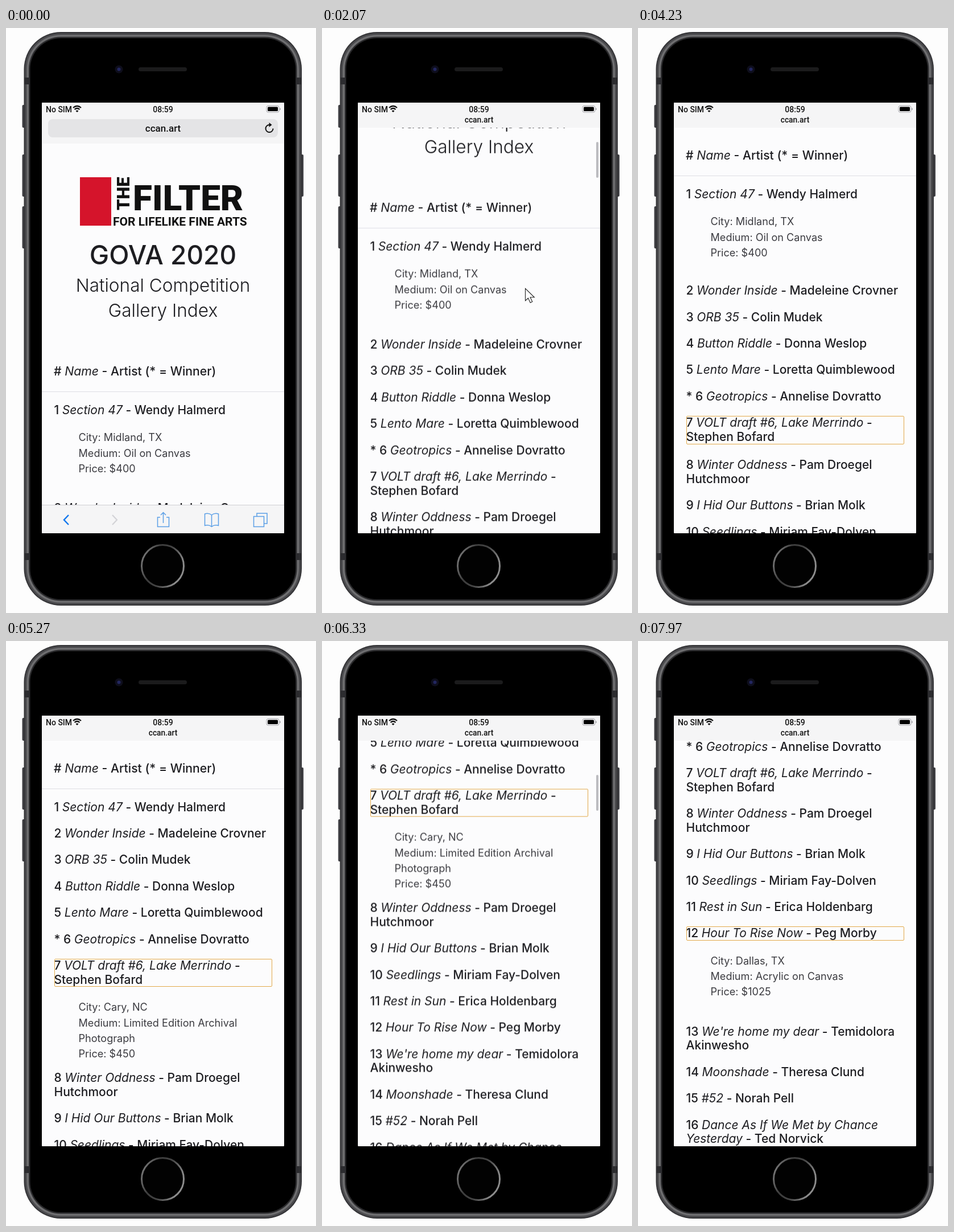
Recreate the animation shown at these times as an HTML page. Size 545 by 1027 pixels, loop 8000 ms.

```html
<!DOCTYPE html>
<html lang="en">
<head>
<meta charset="utf-8">
<title>Gallery index on a phone</title>
<style>
html, body { margin: 0; width: 100%; height: 100%; overflow: hidden; background: #fdfdfd; }
#stage { position: relative; width: 545px; height: 1027px; overflow: hidden; color: #1d1d21; }
#stage svg { position: absolute; left: 0; top: 0; overflow: visible; }
#screen { position: absolute; left: 63px; top: 131px; width: 426px; height: 756px; overflow: hidden; background: #fcfcfd; border-radius: 1px; }
/* children of .origin use stage coordinates */
.origin { position: absolute; left: -63px; top: -131px; width: 545px; height: 1027px; }
#page { font-family: Inter, "Open Sans", sans-serif; white-space: nowrap; will-change: transform; }
.line { position: absolute; left: 63px; width: 426px; text-align: center; line-height: 50px; }
.big { top: 373px; font-size: 46px; font-weight: 500; }
.sub { font-size: 31.6px; font-weight: 300; }
.head { position: absolute; left: 84px; top: 590px; font-size: 21.2px; line-height: 24.7px; font-weight: 450; }
.rule { position: absolute; left: 63px; top: 638px; width: 426px; height: 1px; background: #dedee4; }
#list { position: absolute; left: 84.5px; top: 658.6px; width: 383px; }
.item { margin-bottom: 21.7px; }
.name { font-size: 21px; line-height: 24.7px; font-weight: 450; border-radius: 2px; }
.name.on { outline: 1.5px solid #e2a94a; outline-offset: -1px; }
.info { overflow: hidden; height: 0; font-size: 18.1px; line-height: 27.2px; color: #3b3b40; }
.info div { padding: 22px 0 0 43px; }
.bar { position: absolute; background: #f5f5f6; left: 63px; width: 426px; }
#top { top: 131px; height: 72px; }
#field { position: absolute; left: 74px; top: 160px; width: 404px; height: 32px; border-radius: 8px; background: #e4e4e6; }
.ui { position: absolute; font: 500 14px/20px Roboto, sans-serif; color: #111; }
#url { left: 176px; width: 200px; top: 166px; text-align: center; font-size: 17px; }
#thumb { position: absolute; left: 482px; width: 4px; height: 63px; border-radius: 2px; background: #bcbcc0; }
#tools { top: 837px; height: 49px; border-top: 1px solid #cfcfd4; }
</style>
</head>
<body>
<div id="stage">
  <svg width="545" height="1027">
    <defs>
      <linearGradient id="ring" x2="1" y2=".4">
        <stop offset="0" stop-color="#8c8c8c"/><stop offset=".4" stop-color="#3c3c3c"/>
        <stop offset=".65" stop-color="#444"/><stop offset="1" stop-color="#8c8c8c"/>
      </linearGradient>
    </defs>
    <g fill="#3f3f43">
      <rect x="28.500" y="135" width="6" height="40" rx="2"/>
      <rect x="28.500" y="222" width="6" height="74" rx="2"/>
      <rect x="28.500" y="313" width="6" height="74" rx="2"/>
      <rect x="517" y="222" width="6" height="74" rx="2"/>
    </g>
    <g id="shell"></g>
    <g fill="#2c2c2f">
      <rect x="32" y="87" width="9" height="12"/><rect x="511" y="87" width="9" height="12"/>
      <rect x="32" y="922" width="9" height="12"/><rect x="511" y="922" width="9" height="12"/>
    </g>
    <circle cx="198.500" cy="72.500" r="7" fill="#0e0e1c"/>
    <circle cx="198.500" cy="72.500" r="3" fill="#22265f"/>
    <rect x="233" y="69" width="85" height="7" rx="3.500" fill="#1b1b1c"/>
    <circle cx="275.500" cy="944.500" r="37" fill="#020202" stroke="url(#ring)" stroke-width="3"/>
  </svg>

  <div id="screen">
    <div id="page" class="origin">
      <svg width="545" height="400" font-family="Roboto, sans-serif" font-weight="900" fill="#111">
        <rect x="130" y="262" width="55" height="85" fill="#d5142b"/>
        <text font-size="31" transform="translate(217 320) rotate(-90)">THE</text>
        <text x="223" y="320" font-size="62">FILTER</text>
        <text x="188" y="347" font-size="21" font-weight="700">FOR LIFELIKE FINE ARTS</text>
      </svg>
      <div class="line big">GOVA 2020</div>
      <div class="line sub" style="top:427px">National Competition</div>
      <div class="line sub" style="top:471px">Gallery Index</div>
      <div class="head"># <i>Name</i> - Artist (* = Winner)</div>
      <div class="rule"></div>
      <div id="list"></div>
    </div>
    <div class="origin">
      <div id="thumb"></div>
      <div id="top" class="bar"></div>
      <div id="field"></div>
      <div class="ui" style="left:70px;top:133px">No SIM</div>
      <div class="ui" style="left:226px;width:100px;top:133px;text-align:center">08:59</div>
      <div class="ui" id="url">ccan.art</div>
      <svg width="545" height="210" fill="none" stroke="#111" stroke-width="2">
        <path d="M118 140q7-6 14 0M120.500 143q4.500-4 9 0" stroke-width="2.200"/>
        <path d="M122.500 145.500q2.500-2.200 5 0l-2.500 2.500z" fill="#111" stroke="none"/>
        <rect x="458" y="136.500" width="22" height="11.500" rx="3" stroke="#a5a5aa" stroke-width="1"/>
        <rect x="460" y="138.500" width="18" height="7.500" rx="1.500" fill="#000" stroke="none"/>
        <path d="M482 140.500v3.500" stroke="#a5a5aa" stroke-width="1.500"/>
        <g id="reload"><path d="M463 170a6.500 6.500 0 1 0 6.500 6.500"/><path d="M462.500 166l5 4-5 4z" fill="#111" stroke="none"/></g>
      </svg>
      <div id="foot" class="origin" style="left:0;top:0">
        <div id="tools" class="bar"></div>
        <svg width="545" height="890" fill="none" stroke="#5b9fe6" stroke-width="1.500">
          <path d="M110 855l-8 8.500 8 8.500" stroke="#1478ee" stroke-width="2.500"/>
          <path d="M187 855l8 8.500-8 8.500" stroke="#d3d3d7" stroke-width="2.200"/>
          <path d="M271 859h-4.500v16.500h20V859H282M276.500 869v-18M272 855l4.500-4.500 4.500 4.500"/>
          <path d="M361.500 855q-5-4-12-2v20.500q7-2 12 2 5-4 12-2V853q-7-2-12 2v20"/>
          <path d="M441 857v-5h18v18h-5M435.500 857.500h18v18h-18z"/>
        </svg>
      </div>
    </div>
  </div>
  <svg id="cursor" width="20" height="30"><path d="M.5.500v21.500l5-4.500 3.700 8 3.600-1.700-3.700-7.800h7.200z" fill="#fff" stroke="#222" stroke-width="1.100"/></svg>
</div>
<script>
const $ = id => document.getElementById(id);

// Metal rim: nested rounded shapes, inset then colour
$('shell').innerHTML = [[0, '#343437'], [2, '#4a4a4d'], [5, '#6e6e70'], [8.5, '#2a2a2c'], [11, '#000']]
  .map(([d, fill]) => `<rect x="${31.5 + d}" y="${7 + d}" width="${488.5 - 2 * d}" height="${1007 - 2 * d}" rx="${65 - d}" fill="${fill}"/>`)
  .join('');

// number, title, artist; "|" marks a line break
const works = `1;Section 47;Wendy Halmerd
2;Wonder Inside;Madeleine Crovner
3;ORB 35;Colin Mudek
4;Button Riddle;Donna Weslop
5;Lento Mare;Loretta Quimblewood
* 6;Geotropics;Annelise Dovratto
7;VOLT draft #6, Lake Merrindo;|Stephen Bofard
8;Winter Oddness;Pam Droegel|Hutchmoor
9;I Hid Our Buttons;Brian Molk
10;Seedlings;Miriam Fay-Dolven
11;Rest in Sun;Erica Holdenbarg
12;Hour To Rise Now;Peg Morby
13;We're home my dear;Temidolora|Akinwesho
14;Moonshade;Theresa Clund
15;#52;Norah Pell
16;Dance As If We Met by Chance|Yesterday;Ted Norvick`;

const details = {
  1: 'City: Midland, TX|Medium: Oil on Canvas|Price: $400',
  7: 'City: Cary, NC|Medium: Limited Edition Archival|Photograph|Price: $450',
  12: 'City: Dallas, TX|Medium: Acrylic on Canvas|Price: $1025'
};

const br = s => s.replace(/\|/g, '<br>');
$('list').innerHTML = works.split('\n').map((row, i) => {
  const [num, title, artist] = row.split(';'), info = details[i + 1];
  return `<div class="item"><div class="name" id="name${i + 1}">${num} <i>${br(title)}</i> - ${br(artist)}</div>` +
    (info ? `<div class="info" id="info${i + 1}"><div>${br(info)}</div></div>` : '') + '</div>';
}).join('');

const LOOP = 8000, OPEN_H = 126, TAP_7 = 4200, TAP_12 = 7350, TAP_MS = 350;

const clamp = v => Math.min(1, Math.max(0, v));
const ramp = (t, from, to) => clamp((t - from) / (to - from));
const ease = p => p * p * (3 - 2 * p);

// Smooth curve through [time, value] points, never overshooting
function track(points) {
  const slope = points.slice(1).map(([t, v], i) => (v - points[i][1]) / (t - points[i][0]));
  const tangent = points.map((_, i) => {
    const a = slope[i - 1], b = slope[i];
    return a * b > 0 ? 2 * a * b / (a + b) : 0;
  });
  return t => {
    const last = points.length - 1;
    if (t <= points[0][0]) return points[0][1];
    if (t >= points[last][0]) return points[last][1];
    const i = points.findIndex(p => p[0] > t) - 1;
    const [t0, v0] = points[i], [t1, v1] = points[i + 1];
    const d = t1 - t0, p = (t - t0) / d, q = 1 - p;
    return v0 + (v1 - v0) * ease(p) + d * p * q * (tangent[i] * q - tangent[i + 1] * p);
  };
}

const scrollAt = track([[1350, 0], [1700, 110], [2070, 287], [2450, 360], [2800, 379],
  [5500, 379], [5970, 587], [6350, 680], [6800, 717]]);
const cursorX = track([[650, 400], [1300, 372], [2070, 357], [2800, 347], [3300, 347], [3950, 310]]);
const cursorY = track([[650, 800], [1300, 744], [1700, 634], [2070, 457], [2450, 389], [2800, 371],
  [3300, 371], [3950, 710]]);

function draw(t) {
  const scroll = scrollAt(t);
  $('page').style.transform = `translateY(${-scroll}px)`;

  const seven = ease(ramp(t, TAP_7, TAP_7 + TAP_MS));
  const twelve = ease(ramp(t, TAP_12, TAP_12 + TAP_MS));
  const open = { 1: 1 - seven, 7: seven - twelve, 12: twelve };
  for (const id in open) $('info' + id).style.height = OPEN_H * open[id] + 'px';
  $('name7').classList.toggle('on', t >= TAP_7 && t < TAP_12);
  $('name12').classList.toggle('on', t >= TAP_12);

  const fold = clamp(scroll / 50);
  $('top').style.height = 72 - 28 * fold + 'px';
  $('field').style.opacity = $('reload').style.opacity = clamp(1 - 2 * fold);
  $('field').style.transform = `translateY(${-14 * fold}px)`;
  $('url').style.transform = `translateY(${-14.5 * fold}px) scale(${1 - .19 * fold})`;
  $('foot').style.transform = `translateY(${52 * fold}px)`;

  $('thumb').style.top = 174 + .0907 * scroll + 'px';
  $('thumb').style.opacity = t < 5000
    ? ramp(t, 1350, 1450) * (1 - ramp(t, 3000, 3300))
    : ramp(t, 5500, 5600) * (1 - ramp(t, 6980, 7280));

  $('cursor').style.display = t >= 650 && t < TAP_7 ? '' : 'none';
  $('cursor').style.transform = `translate(${cursorX(t)}px, ${cursorY(t)}px)`;
}

const start = performance.now();
function tick() {
  draw((performance.now() - start) % LOOP);
  requestAnimationFrame(tick);
}
tick();
</script>
</body>
</html>
```
